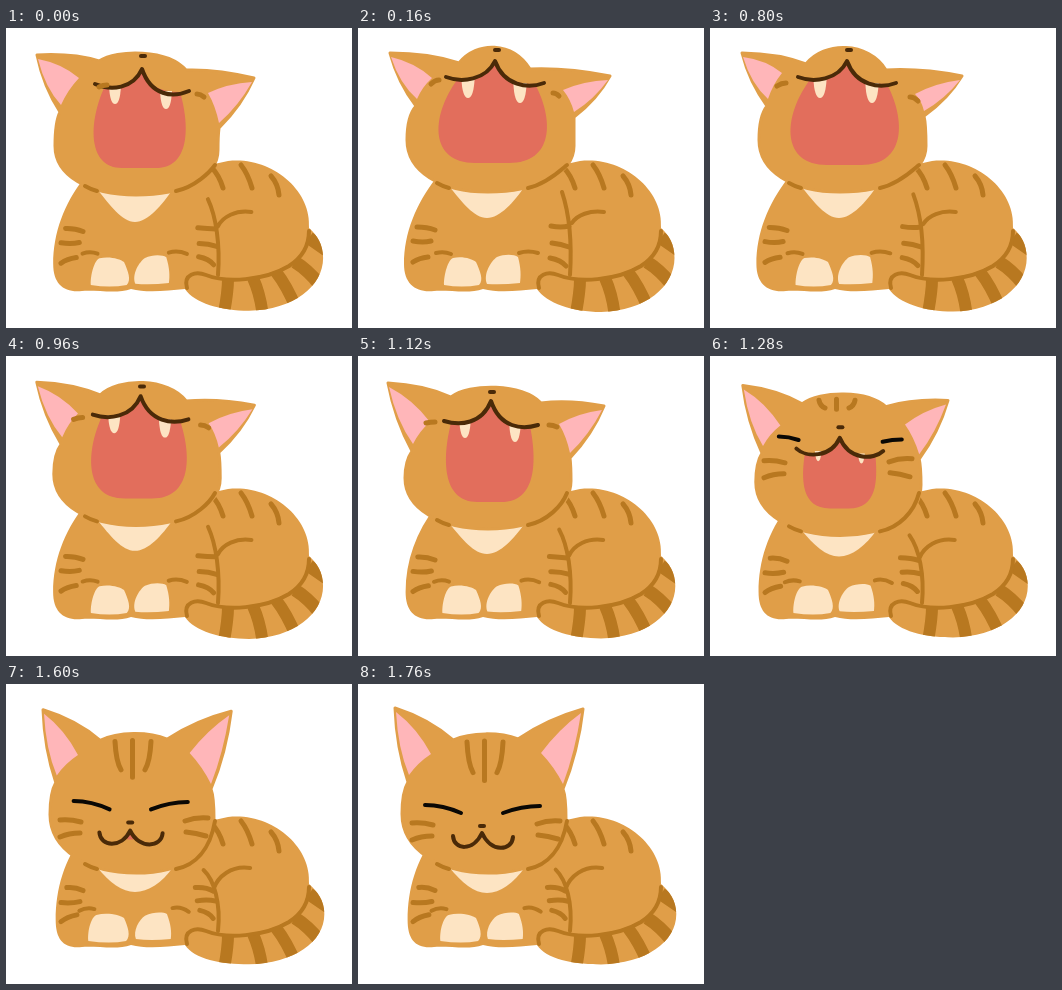
Recreate the animation shown at these times as an HTML page with a canvas. Size 346 by 300 pixels, loop 1.92 s.

```html
<!DOCTYPE html>
<html lang="en">
<head>
<meta charset="utf-8">
<title>Yawning cat</title>
<style>
  html, body { margin: 0; width: 100%; height: 100%; overflow: hidden; background: #fff; }
  canvas { display: block; }
</style>
</head>
<body>
<canvas width="346" height="300"></canvas>
<script>
const ctx = document.querySelector('canvas').getContext('2d');
const FUR = '#e09e48', STRIPE = '#b87820', CREAM = '#fde4c3', PINK = '#ffb6b9',
      RED = '#e26e5c', LIP = '#4a2a08', BLACK = '#0a0805';
const STEP = 160;

const fill = (d, color) => {
  ctx.fillStyle = color;
  ctx.fill(new Path2D(d));
};
const line = (d, width, color = STRIPE, cap = 'round') => {
  ctx.strokeStyle = color;
  ctx.lineWidth = width;
  ctx.lineCap = cap;
  ctx.lineJoin = 'round';
  ctx.stroke(new Path2D(d));
};

const lerp = (a, b, t) => a + (b - a) * t;
const mixPose = (a, b, t) => Object.fromEntries(Object.keys(a).map(k =>
  [k, Array.isArray(a[k]) ? a[k].map((v, i) => lerp(v, b[k][i], t)) : lerp(a[k], b[k], t)]));
const mixPath = (a, b, t) => {
  const to = b.match(/[\d.]+/g);
  let i = 0;
  return a.replace(/[\d.]+/g, v => lerp(+v, +to[i++], t));
};

// ears: left tip, left root, right root, right tip, right base, left base
// lips: left, centre, right, then curl; mouth: corners, side pull, bottom, flat half-width
const start = {
  rest: .3, crown: 21, chin: 167, chest: 194, stripe: 0, cheek: 80, fang: 18,
  ears: [31, 27, 93, 33, 180, 42, 248, 50, 213, 100, 54, 84],
  inner: [73, 50, 202, 65], sides: [49, 118, 212, 122],
  nose: [137, 28], eyes: [93, 59, 101, 57, 191, 66, 198, 69],
  lips: [89, 56, 136, 41, 183, 63, 16, 7, 5],
  mouth: [98, 60, 174, 64, 82, 184, 140, 17], fangs: [109, 58, 160, 63],
};
const wide = {
  rest: 0, crown: 13, chin: 164, chest: 190, stripe: 0, cheek: 80, fang: 20,
  ears: [32, 25, 101, 35, 172, 41, 252, 48, 216, 89, 58, 78],
  inner: [74, 50, 205, 62], sides: [49, 112, 216, 118],
  nose: [139, 22], eyes: [73, 56, 81, 52, 195, 65, 201, 68],
  lips: [88, 49, 137, 33, 186, 55, 16, 6, 3],
  mouth: [99, 52, 177, 56, 72, 196, 135, 17], fangs: [110, 50, 162, 55],
};
const peak = {
  ...wide, crown: 10,
  ears: [28, 30, 91, 36, 180, 46, 254, 55, 212, 93, 60, 84],
  inner: [70, 48, 207, 66], sides: [51, 105, 216, 115],
  nose: [139, 21], eyes: [72, 54, 80, 51, 195, 63, 203, 66],
  lips: [88, 43, 137, 28, 190, 53, 16, 4, 2],
  mouth: [92, 47, 184, 55, 80, 192, 140, 2], fangs: [110, 45, 164, 52],
};
const wideAgain = {
  ...wide, rest: .1, ears: [32, 25, 96, 36, 176, 42, 252, 48, 214, 88, 57, 78],
  inner: [72, 45, 205, 66], eyes: [67, 58, 76, 55, 200, 69, 208, 73],
  mouth: [99, 53, 177, 56, 72, 196, 137, 17],
};
const easing = {
  rest: .4, crown: 27, chin: 173, chest: 198, stripe: 0, cheek: 100, fang: 17,
  ears: [30, 27, 93, 41, 183, 47, 246, 50, 212, 102, 54, 95],
  inner: [72, 66, 201, 68], sides: [47, 122, 213, 125],
  nose: [134, 36], eyes: [68, 67, 77, 66, 191, 69, 199, 71],
  lips: [86, 65, 133, 45, 180, 69, 16, 5, 3],
  mouth: [93, 67, 172, 70, 84, 179, 146, 12], fangs: [107, 65, 157, 69],
};
const smile = {
  rest: 1, crown: 45, chin: 189, chest: 204, stripe: 23, cheek: 132, fang: 0,
  ears: [37, 33, 91, 58, 165, 56, 226, 36, 205, 105, 49, 100],
  inner: [68, 75, 186, 69], sides: [44, 132, 208, 135],
  nose: [125, 124], eyes: [70, 101, 106, 111, 145, 111, 181, 102],
  lips: [87, 134, 125, 137, 163, 134, 1, 16, 18],
  mouth: [97, 147, 156, 148, 102, 150, 162, 6], fangs: [110, 140, 143, 140],
};
const content = {
  rest: .9, crown: 48, chin: 189, chest: 209, stripe: 36, cheek: 147, fang: 0,
  ears: [37, 24, 95, 56, 160, 55, 225, 25, 205, 105, 50, 98],
  inner: [73, 70, 183, 69], sides: [44, 130, 208, 135],
  nose: [124, 142], eyes: [67, 121, 103, 129, 145, 129, 182, 122],
  lips: [95, 152, 124, 149, 155, 153, 1, 14, 16],
  mouth: [124, 154, 124, 154, 124, 124, 154, 0], fangs: [115, 152, 133, 152],
};
const poses = [
  start, wide, mixPose(wide, peak, .5), peak, mixPose(peak, wideAgain, .5), wideAgain,
  mixPose(wideAgain, easing, .6), easing, mixPose(easing, smile, .4), smile,
  mixPose(smile, content, .8), content,
];

function drawBody({ rest: r, chest, chin }) {
  const left = 46 + 4 * r, right = 316.5 + 2 * r, low = 284 - 4 * r;
  const body = `M78 150 C58 176 ${left} 205 ${left} 236 C${left} 256 58 265 76 263
    C92 262 112 266 125 261 C140 265 160 263 179 261 C188 275 215 ${low} 243 ${low}
    C288 ${low - 1} ${right} 258 ${right} 230 C${right} 216 311 207 303 200
    C306 162 265 128 222 133 L190 140Z`;
  fill(body, FUR);
  ctx.save();
  ctx.clip(new Path2D(body));
  line('M222 251 Q222 265 217 290 M247 250 Q255 268 257 290 M270 244 Q281 258 290 280', 12, STRIPE, 'butt');
  line('M289 234 Q302 242 314 257 M303 210 L322 223', 13, STRIPE, 'butt');
  ctx.restore();
  line('M181 260 C177 246 190 243 200 247 C220 255 258 253 283 238 C297 229 303 218 303 203', 4);
  line(mixPath('M204 164 C211 185 214 215 212 247 M246 184 C232 182 219 187 214 195',
    'M197 188 C208 197 215 220 212 247 M244 184 C225 181 211 193 207 206', r), 4);
  line('M206 140 Q213 147 217 160 M235 137 Q242 146 246 160 M265 148 Q272 156 273 167', 5);
  line(mixPath(
    'M59 199 Q69 199 77 202 M55 213 Q65 215 73 213 M55 234 Q61 230 70 229 M193 198 Q203 200 211 198 M194 215 Q203 216 211 219 M192 230 Q203 232 208 238',
    'M61 204 Q69 203 77 207 M55 219 Q65 220 74 218 M55 238 Q61 233 71 231 M189 204 Q200 203 207 208 M191 217 Q201 215 210 217 M194 226 Q203 228 207 234', r), 5);
  line(mixPath('M78 225 Q86 223 93 226 M161 225 Q170 222 180 225',
    'M73 227 Q80 223 88 225 M167 224 Q175 222 183 228', r), 4);
  fill(mixPath(
    'M86 257 C86 246 90 232 95 230 C105 228 114 231 118 234 C122 243 126 252 121 257 Q104 260 86 257Z M129 256 C125 246 133 233 139 229 C146 226 156 226 160 229 C163 240 163 248 162 255 Q144 257 129 256Z',
    'M82 257 C81 246 85 233 90 231 C101 228 114 231 118 234 C122 243 125 252 120 257 Q104 260 82 257Z M130 255 C127 247 133 236 139 232 C147 228 157 228 161 230 C165 240 166 248 165 255 Q145 257 130 255Z', r), CREAM);
  fill(`M91 ${chin - 6} C104 ${chin + 10} 116 ${chest} 129 ${chest} S156 ${chin + 10} 167 ${chin - 6}Z`, CREAM);
}

function drawHead({ ears, inner, sides, crown, chin }) {
  const [ltx, lty, lax, lay, rax, ray, rtx, rty, rbx, rby, lbx, lby] = ears;
  const [lx, ly, rx, ry] = sides;
  const bend = (x1, y1, x2, y2, dx, dy) => `Q${(x1 + x2) / 2 + dx} ${(y1 + y2) / 2 + dy} ${x2} ${y2}`;
  const head = `M${ltx} ${lty} ${bend(ltx, lty, lax, lay, 5, -5)}
    C${lax + 18} ${crown} ${rax - 18} ${crown} ${rax} ${ray}
    ${bend(rax, ray, rtx, rty, -3, -5)} ${bend(rtx, rty, rbx, rby, 5, 3)}
    Q${rx} ${rby + 8} ${rx} ${ry}
    C${rx} ${lerp(ry, chin, .6)} 178 ${chin} 130 ${chin}
    C82 ${chin} ${lx} ${lerp(ly, chin, .6)} ${lx} ${ly}
    Q${lx} ${lby + 10} ${lbx} ${lby} ${bend(lbx, lby, ltx, lty, -5, 3)}Z`;
  fill(head, FUR);
  line(head, 3, FUR);
  const [ix, iy, jx, jy] = inner;
  fill(`M${ltx + 1} ${lty + 4} ${bend(ltx, lty, ix, iy, 4, -3)} ${bend(ix, iy, lbx + 1, lby - 7, -2, -2)}
    ${bend(lbx, lby, ltx + 1, lty + 4, -4, 2)}Z
    M${rtx - 2} ${rty + 4} ${bend(rtx, rty, jx, jy, -3, -2)} ${bend(jx, jy, rbx, rby - 5, 2, -2)}
    ${bend(rbx, rby, rtx - 2, rty + 4, 3, 1)}Z`, PINK);
  line(`M79 ${chin - 9} Q84 ${chin - 6} 91 ${chin - 4}
    M170 ${chin - 4} C189 ${chin - 8} 204 ${chin - 23} 209 137`, 4);
}

function drawFace({ nose, eyes, lips, mouth, fangs, fang, stripe, cheek, crown }, awake) {
  const [lx, ly, cx, cy, rx, ry, reach, curl, dip] = lips;
  const [x1, y1, x2, y2, pullL, pullR, low, flat] = mouth;
  const mid = (pullL + pullR) / 2;
  fill(`M${x1} ${y1} Q${cx - 8} ${y1} ${cx} ${cy + 2} Q${cx + 8} ${y2} ${x2} ${y2}
    C${pullR} ${lerp(y2, low, .45)} ${pullR} ${low} ${mid + flat} ${low} H${mid - flat}
    C${pullL} ${low} ${pullL} ${lerp(y1, low, .45)} ${x1} ${y1}Z`, RED);

  const half = fang / 3;
  for (const i of [0, 2]) {
    const x = fangs[i], y = fangs[i + 1];
    fill(`M${x - half} ${y} Q${x - half + 1} ${y + fang} ${x} ${y + fang}
      Q${x + half - 1} ${y + fang} ${x + half} ${y}Z`, CREAM);
  }
  line(`M${lx} ${ly} C${lx + reach} ${ly + curl} ${cx - 9} ${ly + dip} ${cx} ${cy}
    C${cx + 9} ${ry + dip} ${rx - reach} ${ry + curl} ${rx} ${ry}`, 4, LIP);
  line(`M${nose[0] - 2} ${nose[1]} h4`, 4, LIP);

  const [a, b, c, d, e, f, g, h] = eyes;
  line(`M${a} ${b} Q${(a + c) / 2} ${Math.min(b, d)} ${c} ${d}
    M${e} ${f} Q${(e + g) / 2} ${Math.min(f, h)} ${g} ${h}`, awake ? 4 : 5, awake ? BLACK : STRIPE);
  if (!awake) return;
  const top = crown + 10;
  line(`M109 ${top} q1 ${stripe * .6} 6 ${stripe * .85} M126.5 ${top - 1} v${stripe * 1.1}
    M145 ${top} q-1 ${stripe * .6} -6 ${stripe * .85}`, 5);
  line(`M54 ${cheek - 8} Q64 ${cheek - 9} 75 ${cheek - 6} M54 ${cheek + 9} Q63 ${cheek + 5} 74 ${cheek + 5}
    M179 ${cheek - 7} Q190 ${cheek - 11} 202 ${cheek - 10} M180 ${cheek + 4} Q190 ${cheek + 5} 200 ${cheek + 8}`, 5);
}

function render(now) {
  const step = Math.floor(now / STEP) % poses.length;
  const pose = poses[step];
  ctx.fillStyle = '#fff';
  ctx.fillRect(0, 0, 346, 300);
  drawBody(pose);
  drawHead(pose);
  drawFace(pose, step >= 8);
}

let began;
requestAnimationFrame(function tick(now) {
  began ??= now;
  render(now - began);
  requestAnimationFrame(tick);
});
</script>
</body>
</html>
```
